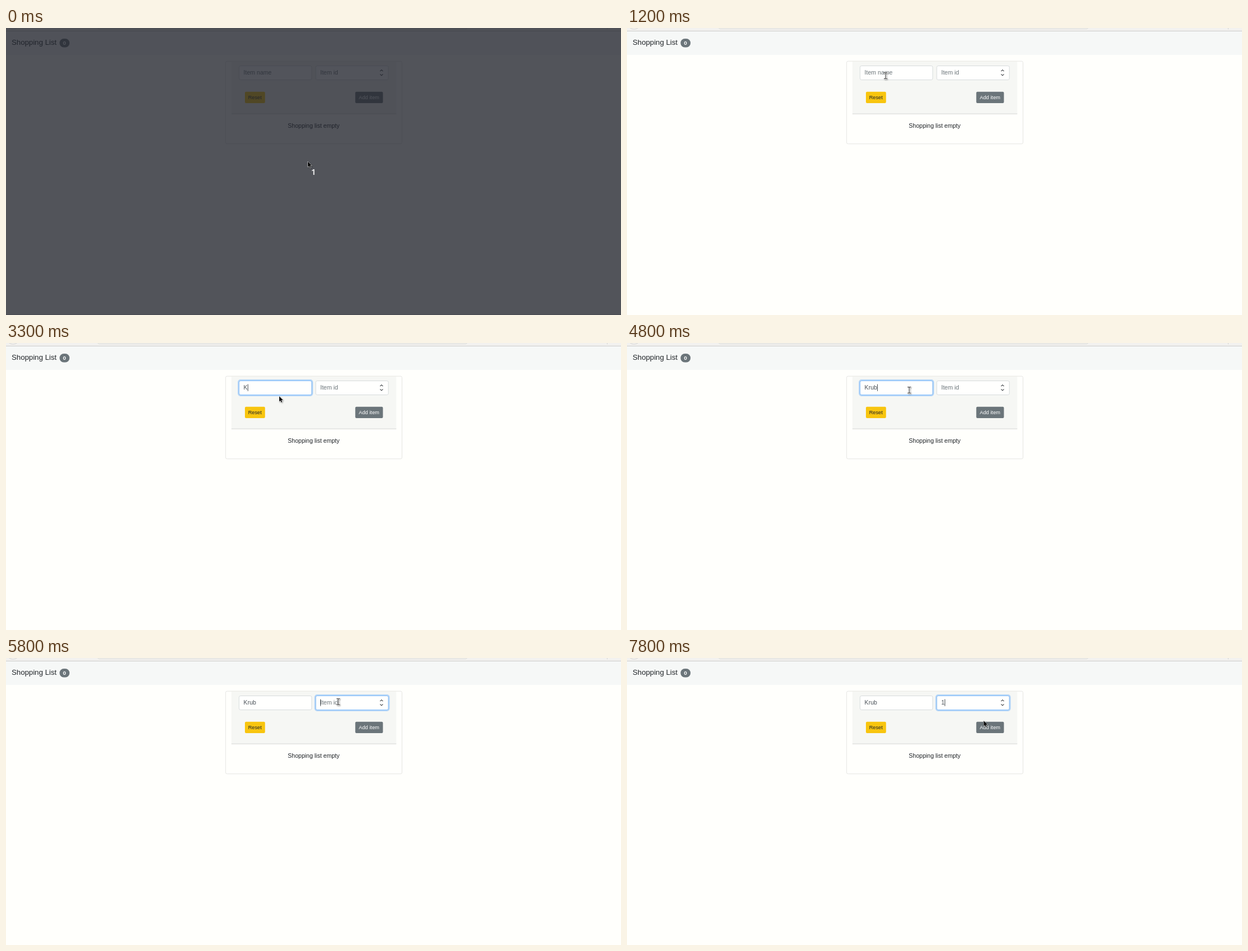
An HTML page for the animation above (8 s loop, 1094 px wide and 512 px high).

```html
<!DOCTYPE html>
<html lang="en">
<head>
<meta charset="utf-8">
<title>Shopping List</title>
<style>
  html, body { margin: 0; width: 100%; height: 100%; overflow: hidden; background: #fffffc; }
  svg { display: block; width: 1094px; height: 512px; }
  text { font: 10.56px "Liberation Sans", Arial, sans-serif; fill: #212529; white-space: pre; }
  .brand { font-size: 13.2px; }
  .badge { font-size: 9.9px; font-weight: 700; fill: #fff; }
  .button { font-size: 9.24px; }
  .light { fill: #fff; }
  .mid { text-anchor: middle; }
  .count { font: 600 15px "Open Sans", "Noto Sans", sans-serif; fill: #fff; }
  .box { fill: #fffffe; stroke: #ced3d6; stroke-width: .8; }
  .ring { fill: none; stroke: #007bff; stroke-opacity: .27; stroke-width: 2.2; }
  .edge { fill: none; stroke: #80bdff; stroke-width: .9; }
  .caret { fill: #343a40; }
</style>
</head>
<body>
<svg viewBox="0 0 1094 512">
  <defs>
    <filter id="shadow" x="-60%" y="-60%" width="220%" height="220%">
      <feDropShadow dx="1" dy="1.2" stdDeviation=".9" flood-opacity=".4"/>
    </filter>
  </defs>

  <rect width="1094" height="512" fill="#fffffc"/>
  <rect width="1094" height="5" fill="#f2f1ef"/>
  <path d="M163.500 0Q164 1.500 166 1.500H817Q819.500 1.500 820 0" fill="#f7f7f5" stroke="#cfcecb" stroke-width=".8"/>
  <path d="M5.500 0Q12.500 4.500 19.500 0M1069.500 0V2.500" fill="none" stroke="#cfcecb" stroke-width=".8"/>
  <rect y="5" width="1094" height="43" fill="#f6f8f7"/>
  <rect y="5" width="1094" height="1" fill="#cdcdcb"/>
  <text class="brand" x="10" y="30">Shopping List</text>
  <rect x="95.300" y="19" width="17.700" height="15.500" rx="7.500" fill="#6b757a"/>
  <text class="badge mid" x="104.100" y="30.300">0</text>

  <rect x="390.700" y="59.200" width="313.700" height="147.500" rx="2.600" fill="#fffffc" stroke="#dfdfdc" stroke-width=".8"/>
  <rect x="401" y="60" width="293.300" height="93" fill="#f6f7f4"/>
  <rect x="401" y="152.700" width="293.300" height=".9" fill="#cfd1cf"/>
  <g id="fields"></g>
  <path d="M665.500 77.200L668 74.700L670.500 77.200M665.500 82.300L668 84.800L670.500 82.300" fill="none" stroke="#33383c" stroke-width="1.100"/>

  <rect x="425" y="113.700" width="35.800" height="20.300" rx="2" fill="#f8c50f"/>
  <text class="button mid" x="442.700" y="127.100">Reset</text>
  <rect x="621.300" y="113.700" width="49.200" height="20.300" rx="2" fill="#6b757a"/>
  <text class="button light mid" x="645.800" y="127.100">Add item</text>
  <text class="mid" x="547.300" y="178">Shopping list empty</text>

  <g id="countdown">
    <rect width="1094" height="512" fill="#21232d" fill-opacity=".775"/>
    <rect y="510.500" width="1094" height="1.500" fill="#4a4c54"/>
    <text class="count mid" x="547" y="262">1</text>
  </g>

  <g id="pointer" filter="url(#shadow)">
    <path id="arrow" d="M0 0V9.600L2.200 7.600L3.700 10.900L5.300 10.200L3.800 7H6.900Z" fill="#0a0a0a" stroke="#fff" stroke-width=".9" paint-order="stroke"/>
    <g id="beam" fill="none">
      <path d="M-3 -5.300H-.8L0 -4.500L.8 -5.300H3M0 -4.500V4.500M-3 5.300H-.8L0 4.500L.8 5.300H3" stroke="#fff" stroke-width="2.600"/>
      <path d="M-3 -5.300H-.8L0 -4.500L.8 -5.300H3M0 -4.500V4.500M-3 5.300H-.8L0 4.500L.8 5.300H3" stroke="#4b4b4b" stroke-width="1.200"/>
    </g>
  </g>
</svg>

<script>
const LOOP = 8000;
const byId = id => document.getElementById(id);

// Each row: start time, then the values held until the next row.
const pointerSteps = [
  [0, 537, 238.5, 'arrow'],
  [600, 535, 232, 'arrow'], [700, 525, 208, 'arrow'], [800, 507, 172, 'arrow'],
  [900, 488, 135, 'arrow'], [1000, 473, 107, 'arrow'], [1100, 464, 90, 'beam'], [1200, 460, 85, 'beam'],
  [1600, 482, 89, 'beam'], [1700, 548, 105, 'arrow'], [1800, 618, 120, 'arrow'],
  [1900, 590, 115, 'arrow'], [2000, 521, 102, 'arrow'], [2100, 486, 95, 'arrow'],
  [4800, 502, 84, 'beam'], [4900, 518, 77, 'beam'],
  [5100, 536, 70, 'beam'], [5200, 567, 70, 'beam'], [5300, 597, 77, 'beam'], [5400, 591, 78, 'beam'],
  [7400, 594, 80, 'beam'], [7500, 605, 86, 'beam'], [7600, 619, 98, 'arrow'],
  [7700, 630, 108, 'arrow'], [7800, 634.5, 112, 'arrow']
];

const fields = [
  {
    x: 414.6, hint: 'Item name',
    text: [[0, ''], [3300, 'K'], [4000, 'Kr'], [4400, 'Krub']],
    caret: [[0, 0], [1500, 1], [2800, 0], [3300, 1], [5100, 0]],
    focus: [[0, 0], [1600, .6], [1700, 1], [5700, .4], [5800, 0]]
  },
  {
    x: 551, hint: 'Item id',
    text: [[0, ''], [6900, '1']],
    caret: [[0, 0], [5600, 1], [6800, 0], [6900, 1]],
    focus: [[0, 0], [5700, .6], [5800, 1]]
  }
];

const held = (steps, t) => steps.findLast(step => step[0] <= t);

function add(parent, tag, attributes) {
  const node = document.createElementNS('http://www.w3.org/2000/svg', tag);
  for (const name in attributes) node.setAttribute(name, attributes[name]);
  return parent.appendChild(node);
}

for (const field of fields) {
  const frame = { x: field.x, y: 67.5, width: 129.2, height: 25, rx: 2.6 };
  const layer = byId('fields');
  add(layer, 'rect', { ...frame, class: 'box' });
  field.glow = add(layer, 'g', {});
  add(field.glow, 'rect', {
    x: field.x - 1.3, y: 66.2, width: 131.8, height: 27.6, rx: 3.7, class: 'ring'
  });
  add(field.glow, 'rect', { ...frame, class: 'edge' });
  field.label = add(layer, 'text', { x: field.x + 8, y: 83.4 });
  field.bar = add(layer, 'rect', { y: 73.5, width: .9, height: 12.3, class: 'caret' });
}

function drawField(field, t) {
  const value = held(field.text, t)[1];
  field.glow.style.opacity = held(field.focus, t)[1];
  field.label.textContent = value || field.hint;
  field.label.style.fill = value ? '#495057' : '#6c757a';
  const width = value ? field.label.getComputedTextLength() : 0;
  field.bar.setAttribute('x', field.x + 8.2 + width);
  field.bar.style.opacity = held(field.caret, t)[1];
}

function draw(t) {
  byId('countdown').style.display = t < 400 ? '' : 'none';
  const [, x, y, shape] = held(pointerSteps, t);
  byId('pointer').setAttribute('transform', `translate(${x} ${y})`);
  for (const id of ['arrow', 'beam']) byId(id).style.display = id === shape ? '' : 'none';
  fields.forEach(field => drawField(field, t));
}

const start = performance.now();
function tick() {
  draw((performance.now() - start) % LOOP);
  requestAnimationFrame(tick);
}
tick();
</script>
</body>
</html>
```
